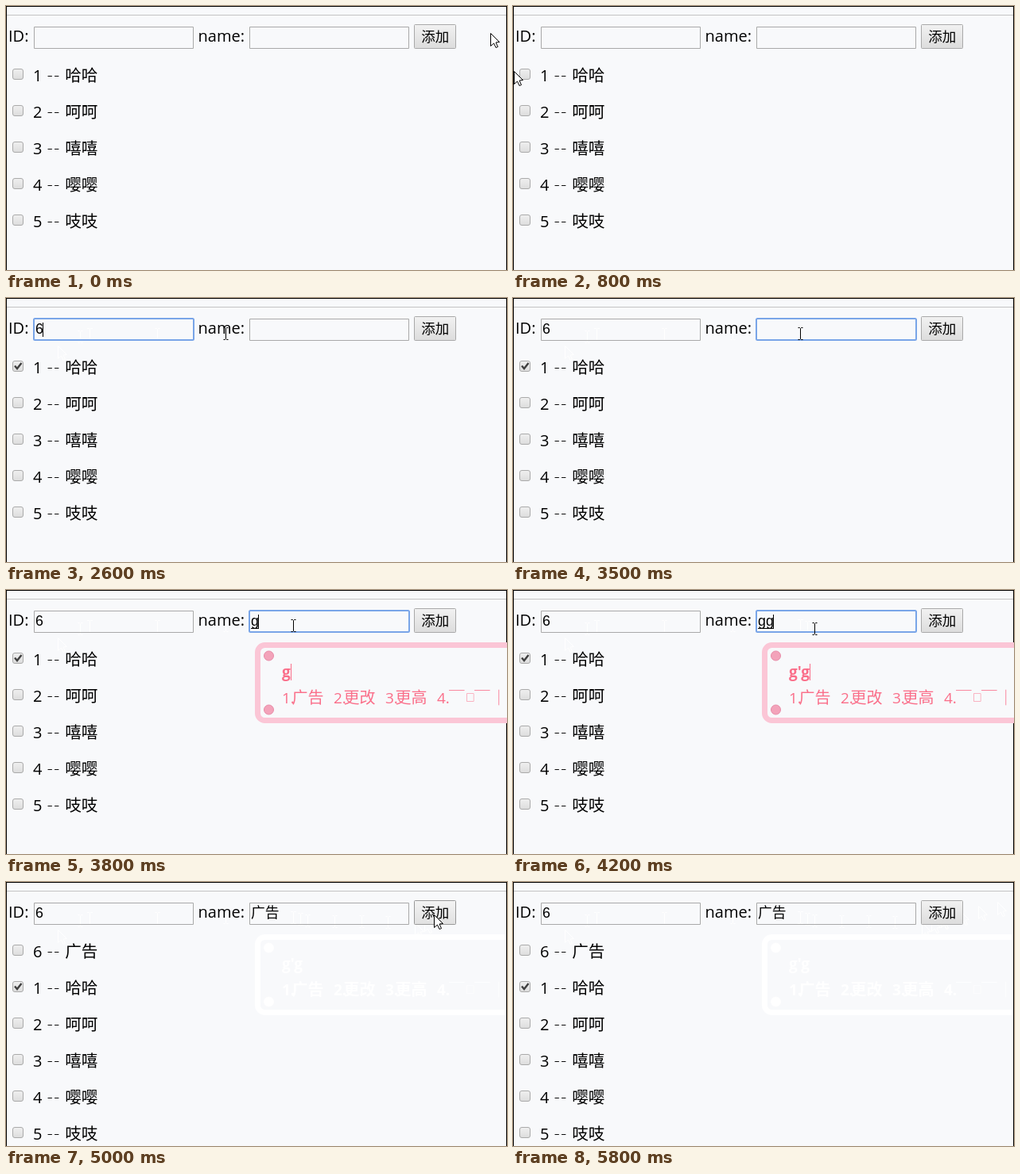
An HTML page with a canvas for the animation above (6100 ms loop, 630 by 333 pixels).

```html
<!DOCTYPE html>
<html lang="zh">
<head>
<meta charset="utf-8">
<style>
  html, body { margin: 0; width: 100%; height: 100%; overflow: hidden; background: #f8f9fb; }
  canvas { display: block; }
</style>
</head>
<body>
<canvas id="stage" width="630" height="333"></canvas>
<script>
const ctx = document.getElementById('stage').getContext('2d');
const LOOP = 6100, STEP = 100, TRAIL_START = 1600, COMMIT = 4300, LEAVE = 5800;
const BG = '#f8f9fb';
const LATIN = '"Open Sans", "Noto Sans", sans-serif';
const CJK = '"Noto Sans CJK SC", "Noto Sans CJK", "Noto Sans CJK JP", sans-serif';
const FIELD = '"Liberation Sans", "Noto Sans CJK SC", "Noto Sans CJK", sans-serif';
const names = ['哈哈', '呵呵', '嘻嘻', '嘤嘤', '吱吱'];

// Each event changes part of the form's state
const events = [
  { at: 0, id: '', name: '' },
  { at: 1200, checked: true },
  { at: 1800, focus: 'id' },
  { at: 2400, id: '6' },
  { at: 3000, focus: 'name' },
  { at: 3800, name: 'g', panel: 'g' },
  { at: 3900, name: 'gg', panel: "g'g" },
  { at: COMMIT, name: '广告', panel: '' },
  { at: 4800, focus: '', pressed: true },
  { at: 4900, pressed: false, added: true }
];

// The pointer's stops; it moves evenly between them, with an optional sag
const stops = [
  { at: 0, x: 609, y: 34 },
  { at: 800, x: 1, y: 82, sag: 65 },
  { at: 1000, x: 24, y: 87 },
  { at: 1400, x: 10, y: 82 },
  { at: 1700, x: 93, y: 49 },
  { at: 1800, x: 105, y: 46 },
  { at: 2400, x: 105, y: 46 },
  { at: 2700, x: 361, y: 45 },
  { at: 4000, x: 361, y: 45 },
  { at: 4200, x: 379, y: 49 },
  { at: 4600, x: 514, y: 51 },
  { at: 4800, x: 538, y: 41 },
  { at: 5400, x: 538, y: 41 },
  { at: 5700, x: 609, y: 25 }
];

function pointerAt(t) {
  const i = stops.findIndex(s => s.at > t);
  if (i < 0) return stops.at(-1);
  const a = stops[i - 1], b = stops[i], p = (t - a.at) / (b.at - a.at);
  return {
    x: Math.round(a.x + (b.x - a.x) * p),
    y: Math.round(a.y + (b.y - a.y) * p + (b.sag || 0) * Math.sin(Math.PI * p))
  };
}

function text(s, x, y, size, family = LATIN, color = '#000', weight = 400) {
  ctx.font = `${weight} ${size}px ${family}`;
  ctx.fillStyle = color;
  ctx.fillText(s, x, y);
  return ctx.measureText(s).width;
}

function rect(x, y, w, h, color) {
  ctx.fillStyle = color;
  ctx.fillRect(x, y, w, h);
}

function box(x, y, w, h, r, fill, stroke, width = 1) {
  ctx.beginPath();
  ctx.roundRect(x, y, w, h, r);
  if (fill) { ctx.fillStyle = fill; ctx.fill(); }
  ctx.lineWidth = width;
  ctx.strokeStyle = stroke;
  ctx.stroke();
}

function line(...points) {
  for (let i = 0; i < points.length; i += 2) {
    if (i) ctx.lineTo(points[i], points[i + 1]);
    else ctx.moveTo(points[i], points[i + 1]);
  }
}

function shade(y, h, top, bottom) {
  const g = ctx.createLinearGradient(0, y, 0, y + h);
  g.addColorStop(0, top);
  g.addColorStop(1, bottom);
  return g;
}

function pointer({ x, y }, trace) {
  const beam = x > 35 && x < 507 && y > 25 && y < 54;
  ctx.save();
  ctx.translate(x + .5, y + .5);
  ctx.strokeStyle = trace ? '#fff' : '#000';
  ctx.lineWidth = 1;
  ctx.beginPath();
  if (beam) {
    line(-3, -8, -1, -8, 0, -7, 1, -8, 3, -8);
    line(0, -7, 0, 6);
    line(-3, 7, -1, 7, 0, 6, 1, 7, 3, 7);
  } else {
    line(0, 0, 0, 16, 4, 12.5, 6.5, 18, 9, 17, 6.5, 11.5, 11, 11);
    ctx.closePath();
    if (!trace) { ctx.fillStyle = '#fff'; ctx.fill(); }
  }
  ctx.stroke();
  ctx.restore();
}

function checkbox(y, checked) {
  box(8.5, y + .5, 13, 13, 2.5, shade(y, 14, '#f0f0f0', '#dcdcdc'), '#aaa');
  if (!checked) return;
  ctx.beginPath();
  line(11, y + 6.5, 14, y + 10, 19.5, y + 3);
  ctx.strokeStyle = '#404040';
  ctx.lineWidth = 2.4;
  ctx.stroke();
}

function row(i, id, name, checked) {
  const y = 95 + 46 * i;
  checkbox(y - 16, checked);
  text(id, 34, y, 20);
  for (const x of [51.5, 60]) text('-', x, y, 23, LATIN, '#000', 300);
  text(name, 74.2, y, 20.6, CJK, '#000', 300);
}

function input(x, focused, value, caret, composing) {
  if (focused) box(x, 26, 201, 27, 1.5, null, '#79a5e8', 2);
  else box(x + .5, 26.5, 200, 27, 0, null, '#a9a9a9');
  const w = text(value, x + 2, 45, 17.8, FIELD, '#000', 300);
  if (caret) rect(Math.round(x + 1.5 + w), 31, 1, 18, '#000');
  if (composing) rect(x + 2, 48, w, 1, '#000');
}

function button(over, pressed) {
  const fill = pressed ? '#e4e4e4' : over ? shade(23, 31, '#f4f4f4', '#e0e0e0') : shade(23, 31, '#f2f2f2', '#dcdcdc');
  box(513.5, 23.5, 52, 30, 1, fill, over ? '#999' : '#a9a9a9');
  text('添加', 522.3, 45, 17.5, CJK, '#000', 300);
}

// Input-method panel; its trace is a white leftover
function panel(word, trace) {
  const ink = trace ? '#fff' : '#fa6f8a', weight = trace ? 700 : 400;
  box(316.5, 69.5, 330, 95, 9, trace ? null : BG, trace ? '#fff' : '#fbc6d6', 7);
  for (const y of [83, 151]) {
    ctx.beginPath();
    ctx.arc(330.5, y, 6, 0, 7);
    ctx.fillStyle = trace ? '#fff' : '#f3a3ba';
    ctx.fill();
    ctx.lineWidth = 1;
    ctx.strokeStyle = trace ? '#fff' : '#e88ca8';
    ctx.stroke();
  }
  const w = text(word, 347, 110, 19, LATIN, ink, 700);
  if (!trace) rect(Math.round(347 + w), 93, 1, 21, ink);
  ['广告', '更改', '更高', ''].forEach((s, i) => {
    const x = 347 + 65 * i;
    text(`${i + 1}.`, x, 143, 19, LATIN, ink, weight);
    text(s, x + 12.5, 143, 20, CJK, ink, weight);
  });
  for (const [s, x] of [['￣', 557], ['￣', 589], ['｜', 610]]) text(s, x, 143, 19.6, CJK, ink);
  text('□', 578, 140, 11.5, CJK, ink, 700);
}

function draw(t) {
  const past = events.filter(e => e.at <= t);
  const form = Object.assign({}, ...past);
  const caretOn = t - form.at < 500;
  const mouse = pointerAt(t);

  rect(0, 0, 630, 333, BG);
  rect(0, 11, 630, 1, '#c4c4c4');
  for (let s = TRAIL_START; s < t; s += STEP) pointer(pointerAt(s), true);
  if (t >= COMMIT) panel("g'g", true);

  text('ID:', 3, 45, 20);
  text('name:', 241.5, 45, 20);
  const onId = form.focus === 'id', onName = form.focus === 'name';
  input(35, onId, form.id, onId && caretOn);
  input(306, onName, form.name, onName && (caretOn || form.panel), form.panel);
  button(mouse.x > 512 && mouse.x < 566 && mouse.y > 22 && mouse.y < 54, form.pressed);

  const shift = form.added ? 1 : 0;
  if (shift) row(0, '6', '广告', false);
  names.forEach((s, i) => row(i + shift, i + 1, s, i === 0 && form.checked));

  rect(0, 0, 630, 1, '#000');
  rect(0, 0, 1, 333, '#000');
  rect(629, 0, 1, 333, '#000');
  if (form.panel) panel(form.panel, false);
  if (t < LEAVE) pointer(mouse);
}

const start = performance.now();
function tick() {
  const t = (performance.now() - start) % LOOP;
  draw(Math.floor(t / STEP) * STEP);
  requestAnimationFrame(tick);
}
tick();
</script>
</body>
</html>
```
